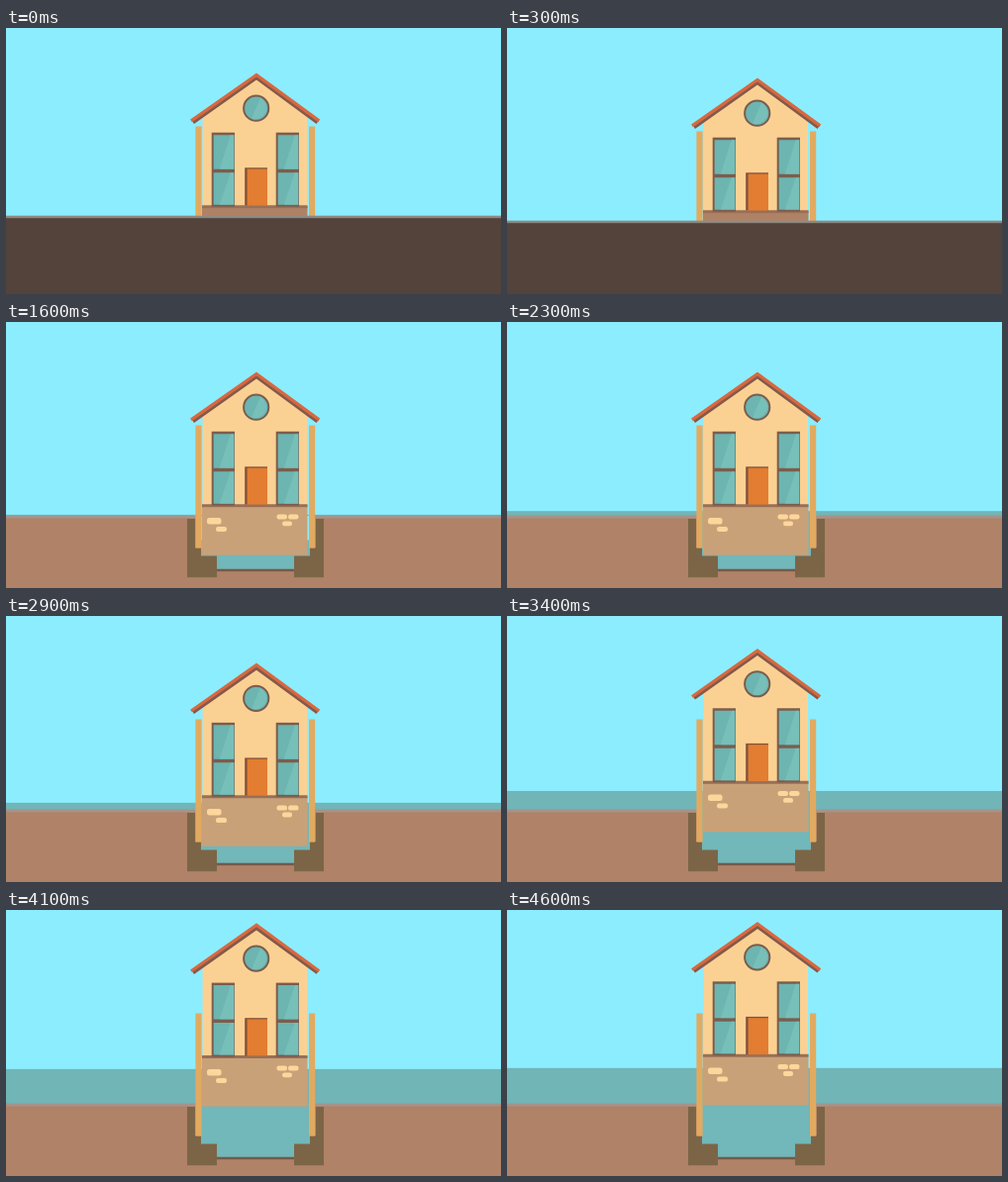
Animation, 500 px wide and 269 px high, one loop 4.7 s. Source, as an HTML page:

```html
<!DOCTYPE html>
<html lang="en">
<head>
<meta charset="utf-8">
<title>Floating house</title>
<style>
  html, body { margin: 0; width: 100%; height: 100%; overflow: hidden; background: #8cedff; }
  svg { display: block; width: 100vw; height: 100vh; }
</style>
</head>
<body>
<svg viewBox="0 0 500 269" preserveAspectRatio="none">
  <defs>
    <clipPath id="trench"><path d="M196 196H307.5V236.5H291V250H213V236.5H196Z"/></clipPath>
    <clipPath id="aboveGround"><path d="M0 0H500V197H0Z"/></clipPath>
    <g id="window">
      <rect width="23.3" height="75" fill="#7b5d4d"/>
      <path d="M2 2.5H22.6V37H2ZM2 40.5H22.6V73H2Z" fill="#6cb5b1"/>
      <path d="M19 2.5H22.6V37H8ZM19 40.5H22.6V73H8Z" fill="#7cc3bc" opacity=".7"/>
    </g>
    <path id="pier" d="M183 199H191V228H197V236.5H213V258.3H183Z" fill="#7c6547"/>
    <rect id="post" x="191.4" y="104.5" width="6.2" height="124.2" fill="#e2aa60"/>
  </defs>

  <rect width="500" height="269" fill="#8cedff"/>
  <g id="scene">
    <rect id="flood" width="500" height="80" fill="#72b5b7" clip-path="url(#aboveGround)"/>
    <rect y="197" width="500" height="85" fill="#b08267"/>
    <rect width="500" height="269" fill="#8cedff" clip-path="url(#trench)"/>
    <g clip-path="url(#trench)"><rect id="pool" x="190" width="124" height="110" fill="#72b7b9"/></g>
    <path d="M0 197H192M312 197H500" stroke="#a6938a" stroke-width="2.8"/>
    <path d="M212 251H292" stroke="#75594a" stroke-width="2.5"/>
    <use href="#pier"/>
    <use href="#pier" transform="translate(504 0) scale(-1 1)"/>

    <g id="house">
      <rect id="base" x="198" y="185" width="106.5" height="50.7"/>
      <g id="bricks" fill="#fdd69c">
        <rect x="203" y="198" width="14.5" height="6.5" rx="2.5"/>
        <rect x="212" y="207" width="11" height="5" rx="2.2"/>
        <rect x="273.5" y="194.5" width="10.5" height="5" rx="2.2"/>
        <rect x="285" y="194.5" width="10.5" height="5" rx="2.2"/>
        <rect x="279" y="201.5" width="10" height="4.8" rx="2.2"/>
      </g>
      <path d="M198.6 185V93L253 54L304 93V185Z" fill="#fbd193"/>
      <path d="M198 185.7H304.5" stroke="#986f57" stroke-width="3"/>
      <path d="M189 100.6L253 55.4L314.5 100.6" fill="none" stroke="#85594a" stroke-width="3.4"/>
      <path d="M187 98.9L253 52.4L316.3 98.9" fill="none" stroke="#d8683f" stroke-width="3.2"/>
      <circle cx="252.7" cy="86.2" r="12.6" fill="#6cb5b1" stroke="#7b5d4d" stroke-width="2"/>
      <path d="M257 75.6A11.5 11.5 0 0 1 248 96.7Z" fill="#7cc3bc" opacity=".7"/>
      <use href="#window" x="207.7" y="110.7"/>
      <use href="#window" x="272.7" y="110.7"/>
      <rect x="241.2" y="146.3" width="22.8" height="38.2" fill="#85523b"/>
      <rect x="243.6" y="147.6" width="20.4" height="37" fill="#e27d31"/>
    </g>

    <use href="#post"/>
    <use href="#post" transform="translate(503.6 0) scale(-1 1)"/>
    <g id="cover">
      <rect y="196.7" width="500" height="85" fill="#53433a"/>
      <path d="M0 196H500" stroke="#8f8a82" stroke-width="2.6"/>
    </g>
  </g>
</svg>
<script>
  const LOOP = 4700, STEP = 100;
  const get = id => document.getElementById(id);
  const [scene, house, base, bricks, flood, pool, cover] =
    ["scene", "house", "base", "bricks", "flood", "pool", "cover"].map(get);

  const progress = (t, from, to) => Math.min(1, Math.max(0, (t - from) / (to - from)));
  const ease = u => (1 - Math.cos(Math.PI * u)) / 2;
  const mix = (a, b, u) => a + (b - a) * u;
  const mixColor = (a, b, u) => `rgb(${a.map((v, i) => Math.round(mix(v, b[i], u)))})`;

  const BURIED = [176, 130, 101], BARE = [201, 161, 120];

  function draw(t) {
    const settle = 1 - (1 - progress(t, 0, 300)) ** 2;
    const reveal = progress(t, 300, 900);
    const lift = ease(progress(t, 2600, 4300));

    scene.setAttribute("transform", `translate(0 ${mix(-5, 0, settle)})`);
    cover.setAttribute("opacity", 1 - reveal);
    bricks.setAttribute("opacity", reveal);
    base.setAttribute("fill", mixColor(BURIED, BARE, reveal));

    // Water creeps over the ground and fills the trench, then lifts the house.
    const level = mix(mix(197, 191.2, progress(t, 1200, 2300)), 159.8, lift);
    flood.setAttribute("y", level);
    pool.setAttribute("y", mix(250, 191, progress(t, 1100, 2100)));
    house.setAttribute("transform", `translate(0 ${-38.4 * lift})`);
  }

  function tick() {
    const t = performance.now() % LOOP;
    draw(Math.floor(t / STEP) * STEP);
    requestAnimationFrame(tick);
  }
  tick();
</script>
</body>
</html>
```
